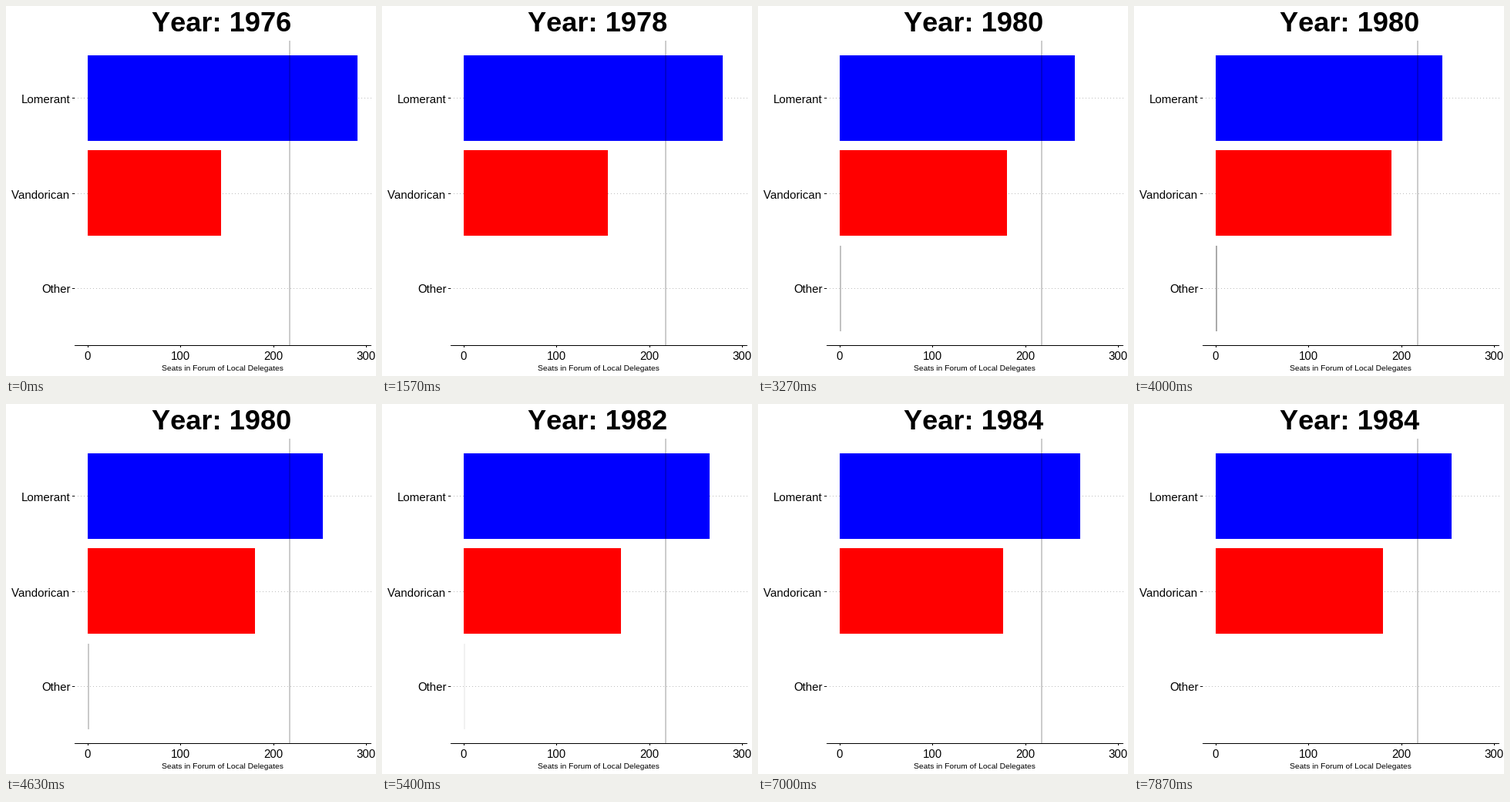
Animation of 480x480 px, one loop 8 s. Source, as a matplotlib script:

```python
import matplotlib
import matplotlib.pyplot as plt
from matplotlib.animation import FuncAnimation
from matplotlib.patches import Rectangle

SIZE = 480
LOOP_MS = 8000
INTERVAL = 20
TICK_MS = 100 / 3  # the motion advances 30 times a second
LEAD, MOVE, CYCLE = 5, 51, 57  # ticks before the first move, per move, per year

LEFT, RIGHT, TOP, BOTTOM = 89, 474, 45, 440
ZERO, SCALE = 105.95, 1.2033  # pixel of zero seats, pixels per seat
BAR_HEIGHT = 111
DIGIT = 8.34  # advance of one axis digit

PARTIES = ["Lomerant", "Vandorican", "Other"]
COLORS = ["#0000ff", "#ff0000", "#a9a9a9"]
ROWS = [119, 243, 366]
BAR_TOPS = [64, 187, 310.5]

# year, then seats of each party
SEATS = [
    (1976, 291, 144, 0),
    (1978, 277, 158, 0),
    (1980, 244, 190, 1),
    (1982, 269, 166, 0),
    (1984, 254, 181, 0),
    (1986, 258, 177, 0),
]

matplotlib.rcParams["font.family"] = "Liberation Sans"
matplotlib.rcParams["text.kerning_factor"] = 6
matplotlib.rcParams["text.hinting"] = "native"

fig = plt.figure(figsize=(SIZE / 72, SIZE / 72), dpi=72, facecolor="white")
ax = fig.add_axes([0, 0, 1, 1])
ax.set_xlim(0, SIZE)
ax.set_ylim(SIZE, 0)
ax.axis("off")


def to_px(seats):
    return round(ZERO + SCALE * seats)


def rect(x, y, w, h, color, z, alpha=1.0):
    patch = Rectangle((x, y), w, h, facecolor=color, edgecolor="none",
                      linewidth=0, alpha=alpha, zorder=z, antialiased=False)
    return ax.add_patch(patch)


def label(x, y, text, size, ha="center", weight="normal"):
    return ax.text(x, y, text, fontsize=size, ha=ha, va="baseline",
                   weight=weight, color="black", zorder=5)


for name, row in zip(PARTIES, ROWS):
    ax.plot([LEFT, RIGHT], [row + 0.5] * 2, color="#bebebe", linewidth=1,
            linestyle=(0, (1, 3)), dash_capstyle="butt", snap=False, zorder=1)
    rect(LEFT - 3, row, 3, 1, "black", 4)
    label(83.5, row + 6.5, name, 15, ha="right")

for seats in (0, 100, 200, 300):
    x = to_px(seats)
    rect(x, BOTTOM, 1, 3, "black", 4)
    text = str(seats)
    label(x - DIGIT * len(text) / 2, 459, text, 15, ha="left")

rect(LEFT, BOTTOM, RIGHT - LEFT, 1, "black", 4)
rect(367, TOP, 2, BOTTOM - TOP, "black", 3, alpha=0.2)  # majority line
label(281, 473, "Seats in Forum of Local Delegates", 10.3)
title = label(279.5, 33, "", 36.3, weight="bold")

x0 = to_px(0)
bars = [rect(x0, y, 0, BAR_HEIGHT, c, 2) for y, c in zip(BAR_TOPS, COLORS)]
bars[2].set_width(2)


def draw(frame):
    # centre of the frame's time span, rounded to the nearest 10 ms
    tick = int((frame * INTERVAL + 15) / TICK_MS)
    step, pos = divmod(max(tick - LEAD, 0), CYCLE)
    p = min(pos / MOVE, 1)
    before, after = SEATS[step], SEATS[step + 1]
    title.set_text(f"Year: {after[0] if p > 0.5 else before[0]}")
    first, second, other = [a + (b - a) * p
                            for a, b in zip(before[1:], after[1:])]
    bars[0].set_width(to_px(first) - x0)
    bars[1].set_width(to_px(second) - x0)
    bars[2].set_alpha(other)  # the single seat fades in and out
    return [title, *bars]


anim = FuncAnimation(fig, draw, frames=LOOP_MS // INTERVAL, interval=INTERVAL,
                     repeat=True, repeat_delay=0, blit=False)
plt.show()
```
